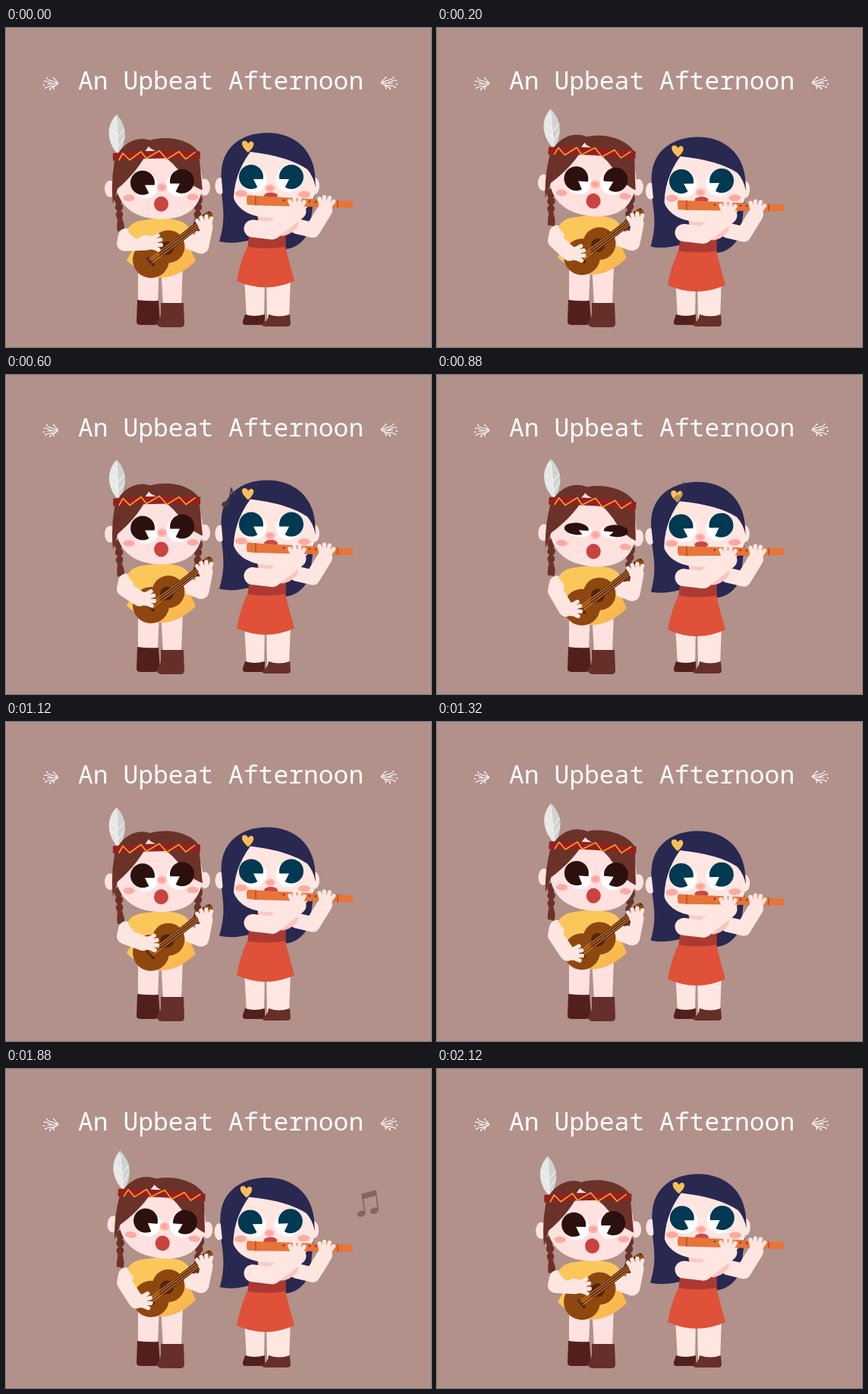
These frames come from a looping animation (560x420 px, 2160 ms). An HTML page:

```html
<!DOCTYPE html>
<html lang="en">
<head>
<meta charset="utf-8">
<title>An Upbeat Afternoon</title>
<style>
html, body { margin: 0; width: 100%; height: 100%; overflow: hidden; background: #b1918a; }
svg { display: block; width: 560px; height: 420px; }
.skin { fill: #ffe6e1; }
.rosy { fill: #ffe1e0; }
.limb { fill: none; stroke: #ffe6e1; stroke-linecap: round; stroke-linejoin: round; }
.hair1 { fill: #6b3229; }
.hair2 { fill: #292851; }
.cheek { fill: #fcaaa2; }
.line { fill: none; stroke-linecap: round; stroke-linejoin: round; }
text { font: 400 33px "Noto Sans Mono", "DejaVu Sans Mono", monospace; fill: #fff; }
</style>
</head>
<body>
<svg viewBox="0 0 560 420">
<defs>
  <linearGradient id="gold" x1="0" y1="0" x2="1" y2="1">
    <stop offset=".5" stop-color="#fcc75a"/><stop offset="1" stop-color="#f9b046"/>
  </linearGradient>
  <radialGradient id="blush">
    <stop offset=".2" stop-color="#ff9f98"/><stop offset="1" stop-color="#ffbdb6"/>
  </radialGradient>
  <g id="eye">
    <circle cx="4" cy="4" r="16.5" fill="#fff"/>
    <circle r="16" fill="currentColor"/>
    <path d="M3 3L17 3L15 9L9 15Z" fill="#fff"/>
  </g>
  <g id="hand">
    <ellipse cy="2" rx="9" ry="8" class="skin"/>
    <path class="limb" stroke-width="5.4" d="M-6 0L-9 -7M-2 -2L-3 -10M3 -2L4 -10M6 1L10 -6"/>
  </g>
  <g id="braid" class="hair1">
    <ellipse cx="148" cy="226" rx="5" ry="7"/>
    <ellipse cx="149" cy="236" rx="5.2" ry="5.5"/>
    <ellipse cx="149.500" cy="246" rx="4.8" ry="5.5"/>
    <path d="M148 250H152Q158 260 155 269Q151 267 147 268Q145 259 148 250Z"/>
    <path class="line" stroke="#8f2a25" stroke-width="2" d="M147 252H153"/>
  </g>
  <g id="sprig" class="line" stroke="#fff" stroke-width="1.1">
    <path d="M10 0L-4 1M9 1L-1 7M8 -1L-4 -5M1 0L-6 -3M3 3L-6 5M10 0L5 -6M5 2L4 8"/>
    <path stroke-width="2" d="M-8 -3h0M-9 2h0M-7 6h0M-5 -7h0M-1 8h0M4 -7h0"/>
  </g>
</defs>
<rect width="560" height="420" fill="#b1918a"/>
<text x="95" y="81">An Upbeat Afternoon</text>
<use href="#sprig" transform="translate(59 73)"/>
<use href="#sprig" transform="translate(505 72) scale(-1.1 1)"/>

<!-- guitar player -->
<path class="rosy" d="M174 312H202L200 362H174ZM204 312H233L231 366H207Z"/>
<path fill="#52201c" d="M173 358Q187 360 201 359L203 388Q200 391 196 391H178Q172 391 172 387Z"/>
<path fill="#672f29" d="M204 362H234L235 389Q235 394 230 394H206Q198 394 199 387Q204 382 204 375Z"/>
<g id="torso1">
  <path fill="url(#gold)" d="M160 266Q168 252 205 251Q232 251 240 262L241 287L250 307Q230 327 205 329Q178 325 159 306L168 290Z"/>
  <path class="limb" stroke-width="21" d="M241 281L257 287L262 262"/>
</g>
<g id="head1">
  <g id="feather">
    <path fill="#e6e8e6" d="M146 114Q134 126 136 143Q138 157 148 167Z"/>
    <path fill="#cfd3d1" d="M146 114Q157 126 157 141Q156 157 148 167Z"/>
    <path class="line" stroke="#f4f5f3" stroke-width="1" d="M146 119L148 167M138 133L146 141M138 144L147 151M156 134L147 145M156 144L148 156"/>
  </g>
  <use href="#braid"/>
  <use href="#braid" transform="translate(402 0) scale(-1 1)"/>
  <ellipse cx="137" cy="212" rx="7" ry="11" class="rosy"/>
  <ellipse cx="262" cy="210" rx="7" ry="11" class="rosy"/>
  <path class="rosy" d="M143 190Q150 152 200 150Q254 154 259 200Q260 252 203 252Q143 250 143 190Z"/>
  <path class="hair1" d="M189 158Q176 187 147 212L141 232Q138 204 143 176L148 165C158 149 175 143 190 148C214 141 244 148 254 164L259 214Q240 207 228 188Q212 168 189 158Z"/>
  <path class="rosy" d="M181 166L188 156L197 166Z"/>
  <path fill="#94201f" d="M141 165Q198 160 256 163V173Q198 170 141 175Z"/>
  <path class="line" stroke="#f2a02b" stroke-width="1.7" d="M149 174L154 165L163 174L178 163L185 172L202 162L212 173L228 163L237 173L249 164"/>
  <g id="eyes1" color="#2c100d">
    <use href="#eye" transform="translate(180 204)"/>
    <use href="#eye" transform="translate(232 202) scale(-1 1)"/>
  </g>
  <ellipse cx="162" cy="224" rx="7.5" ry="4.2" class="cheek"/>
  <ellipse cx="246" cy="223" rx="7.5" ry="4.2" class="cheek"/>
  <ellipse cx="205.500" cy="210" rx="6.500" ry="5.500" fill="url(#blush)"/>
  <ellipse cx="204.500" cy="232" rx="9.500" ry="10" fill="#ca4340"/>
</g>
<g id="guitar">
  <g fill="#8f4710">
    <circle cx="191" cy="305.500" r="24"/>
    <circle cx="214" cy="288" r="21.500"/>
  </g>
  <circle cx="212" cy="290" r="9" fill="#4f260f"/>
  <path class="line" stroke="#5f2b10" stroke-width="9" stroke-linecap="butt" d="M206 296L267 249"/>
  <path class="line" stroke="#8f4a14" stroke-width="11" d="M264 250L267 247"/>
  <path class="line" stroke="#4f260f" stroke-width="4" d="M187 304L194 312"/>
  <path class="line" stroke="#df933c" stroke-width="1" d="M188 305L265 248M190 307L267 250M192 310L268 252"/>
  <path class="line" stroke="#3d1c0c" stroke-width="2.4" d="M260 247h0M268 243h0M269 254h0"/>
  <use href="#hand" transform="translate(262 259) rotate(-12)"/>
</g>
<g id="strum">
  <path id="arm1" class="limb" stroke-width="20"/>
  <path fill="#fcc75a" d="M160 266Q166 254 184 253V272L172 278Q165 275 160 266Z"/>
  <g id="hand1"><use href="#hand" transform="rotate(84)"/></g>
</g>

<!-- flute player -->
<path class="skin" d="M314 328H341L340 382H317ZM343 328H375L373 384H344Z"/>
<path fill="#52201c" d="M315 377Q327 381 341 377V387Q341 391 337 391H316Q311 391 312 386Z"/>
<path fill="#672f29" d="M346 377Q360 382 374 377L375 389Q375 393 370 393H342Q337 393 337 389Q345 387 346 377Z"/>
<g id="backhair">
  <path class="hair2" d="M284 190C281 228 293 240 281 281Q300 286 330 277L362 291Q386 293 400 267L408 205Z"/>
</g>
<g id="torso2">
  <path fill="#fbc9c3" d="M330 240H369L365 262H334Z"/>
  <path fill="#ad3a32" d="M322 256Q346 262 368 250L369 292H318Z"/>
  <path fill="#df5138" d="M318 288Q343 292 368 288Q374 312 380 333Q342 350 304 333Q309 306 318 288Z"/>
</g>
<g id="head2">
  <ellipse cx="282" cy="208" rx="6.500" ry="11" class="skin"/>
  <ellipse cx="407" cy="208" rx="6" ry="11" class="skin"/>
  <path class="skin" d="M299 205L318 160H370L404 188L407 218Q399 250 352 250Q309 250 299 222Z"/>
  <g color="#003952">
    <use href="#eye" transform="translate(323 196)"/>
    <use href="#eye" transform="translate(376 196) scale(-1 1)"/>
  </g>
  <path class="hair2" d="M284 198C281 158 310 138 344 138C382 138 404 162 407 192L408 210Q405 195 397 186Q372 169 322 163Q299 194 300 230L289 240Q285 219 284 198Z"/>
  <path fill="#f7bf5a" d="M319 164Q308 154 312 149Q317 147 319 152Q323 147 326 151Q328 156 319 164Z"/>
  <ellipse cx="310" cy="218" rx="8" ry="4.400" class="cheek"/>
  <ellipse cx="393" cy="219" rx="8" ry="4.400" class="cheek"/>
  <ellipse cx="348" cy="211" rx="6.500" ry="5" fill="url(#blush)"/>
  <ellipse cx="349" cy="221" rx="9" ry="4.500" fill="#c94743"/>
</g>
<g id="arms2">
  <path class="limb" stroke-width="20" d="M383 261L404 266L420 240"/>
  <path fill="#fbc4be" d="M362 268L386 248L384 262Q374 274 362 274Z"/>
  <path class="limb" stroke-width="23" d="M325 264L351 267L384 241"/>
  <g id="flute">
    <path fill="#e7743a" d="M318 220L330 221L457 228V237L330 233.500L318 232.500Q316 226 318 220Z"/>
    <path class="line" stroke="#a7441f" stroke-width="1.2" d="M329 221V233M437 227V236"/>
    <path class="line" stroke="#8c391d" stroke-width="2.800" d="M366 227h0M400 228.500h0M408 229h0M432 230.500h0"/>
  </g>
  <use href="#hand" transform="translate(383 235)"/>
  <use href="#hand" transform="translate(421 233) rotate(8)"/>
</g>

<!-- floating notes -->
<g id="note1" fill="#493a40">
  <ellipse cx="-4" cy="9" rx="5" ry="3.600" transform="rotate(-20 -4 9)"/>
  <path class="line" stroke="#493a40" stroke-width="1.8" d="M0 8L4 -12Q5 -5 9 -4"/>
</g>
<g id="note2" fill="#4a3634">
  <ellipse cx="-10" cy="14" rx="5.500" ry="4" transform="rotate(-20 -10 14)"/>
  <ellipse cx="7" cy="10" rx="5.500" ry="4" transform="rotate(-20 7 10)"/>
  <path class="line" stroke="#4a3634" stroke-width="1.600" d="M-5 13L-9 -11M12 9L9 -16"/>
  <path d="M-10 -12L9 -17L10 -10L-9 -5Z"/>
</g>
</svg>
<script>
const LOOP = 2160, BEAT = 540, STEP = 40;
const $ = id => document.getElementById(id);
const place = (id, value) => $(id).setAttribute('transform', value);

// Interpolates rows of [position, value, value, ...].
function track(rows, p) {
  let i = 1;
  while (i < rows.length - 1 && p > rows[i][0]) i++;
  const a = rows[i - 1], b = rows[i];
  const k = Math.min(1, Math.max(0, (p - a[0]) / (b[0] - a[0])));
  return a.slice(1).map((v, j) => v + (b[j + 1] - v) * k);
}

// beat position, hand x, hand y
const strum = [[0, 194, 283], [.04, 193, 289], [.11, 185, 297], [.33, 185, 297],
  [.44, 181, 308], [.63, 179, 308], [.93, 191, 285], [1, 194, 283]];
// beat position, bob, head turn, flute turn
const flautist = [[0, 0, 0, 0], [.11, .6, 0, 0], [.25, 3, -.5, -.4], [.37, 5.5, -1, -.8],
  [.44, 5.5, -1.2, -.8], [.63, 2.6, -1.6, -2], [.85, .3, -.4, -.4], [1, 0, 0, 0]];
// time, eye opening
const blink = [[780, 1], [860, .5], [910, .5], [990, 1]];
const fade1 = [[440, 0], [560, 1], [760, .9], [960, 0]];
const fade2 = [[1400, 0], [1560, .75], [1760, .75], [2080, 0]];

function drift(id, fade, t, t0, x, y, vx, vy) {
  place(id, `translate(${x + (t - t0) * vx} ${y + (t - t0) * vy})`);
  $(id).setAttribute('opacity', track(fade, t)[0]);
}

function draw(t) {
  const p = t % BEAT / BEAT, turn = 2 * Math.PI;
  const c = -Math.cos(turn * (p - .03));
  const sway = 2.2 + 2.3 * Math.sign(c) * Math.abs(c) ** .6;
  const bob = -1.3 - 3.2 * Math.sin(turn * (p - .05));
  const lift = `translate(0 ${bob})`;
  ['torso1', 'guitar', 'strum'].forEach(id => place(id, lift));
  place('head1', `${lift} rotate(${sway} 205 255)`);
  place('feather', `rotate(${-1.7 * sway} 148 165)`);
  place('eyes1', `translate(0 204) scale(1 ${track(blink, t)[0]}) translate(0 -204)`);

  const [hx, hy] = track(strum, p);
  $('arm1').setAttribute('d', `M158 274L156 284L${hx - 9} ${hy}`);
  place('hand1', `translate(${hx} ${hy})`);

  const [dip, nod, tilt] = track(flautist, p);
  const drop = `translate(0 ${dip})`;
  place('torso2', drop);
  ['backhair', 'head2'].forEach(id => place(id, `${drop} rotate(${nod} 348 250)`));
  place('arms2', drop);
  place('flute', `rotate(${tilt} 388 230)`);

  drift('note1', fade1, t, 600, 293, 161, .1, -.03);
  drift('note2', fade2, t, 1640, 459, 191, .08, -.06);
}

const start = performance.now();
function tick() {
  const t = (performance.now() - start) % LOOP;
  draw(Math.floor(t / STEP) * STEP);
  requestAnimationFrame(tick);
}
tick();
</script>
</body>
</html>
```
